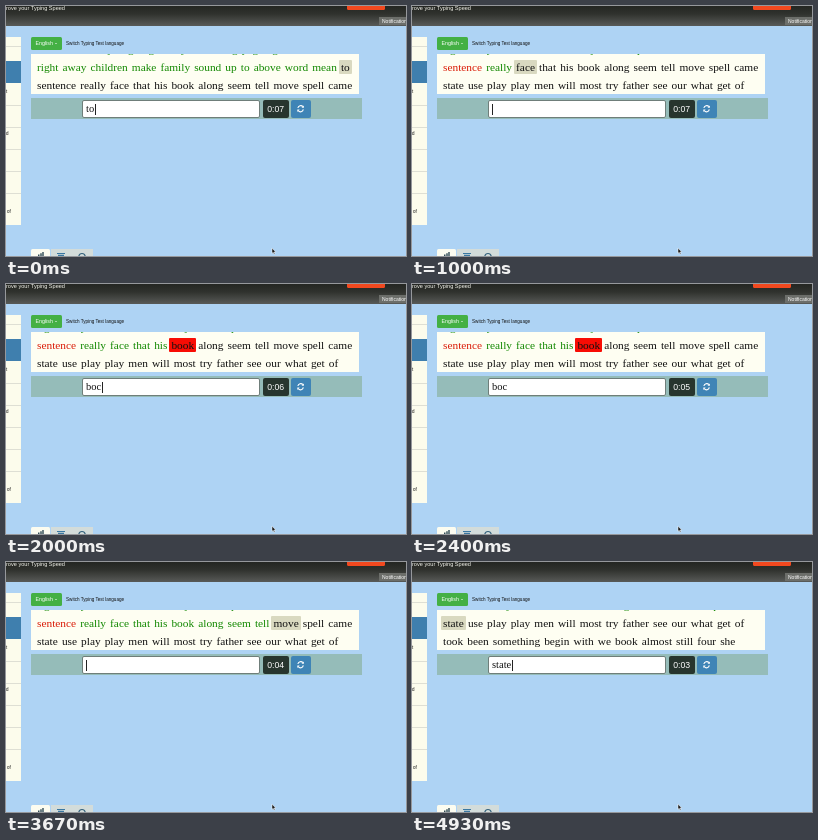
An HTML page for the animation above (4990 ms loop, 400x250 px).

```html
<!DOCTYPE html>
<html lang="en">
<head>
<meta charset="utf-8">
<title>Typing test</title>
<style>
  html, body { margin: 0; width: 100%; height: 100%; overflow: hidden; }
  #stage {
    position: relative; width: 400px; height: 250px; overflow: hidden;
    background: #aed3f4; color: #111;
    font-family: "Liberation Sans", Arial, sans-serif;
  }
  #stage div, #stage svg { position: absolute; white-space: pre; }
  #head { left: 0; top: 0; width: 400px; height: 20px; background: linear-gradient(#242622, #30322e 40%, #585a58); }
  #title { left: 0; top: -2px; font-size: 5.6px; line-height: 8px; color: #f4f4ec; }
  #promo { left: 341px; top: 0; width: 38px; height: 4px; background: #f2491f; border-radius: 0 0 1.5px 1.5px; }
  #note { left: 373px; top: 11px; width: 30px; height: 8px; padding-left: 3px; background: #6c6e6a; color: #fff; font-size: 5px; line-height: 8px; }
  #side { left: 0; top: 31px; width: 14.5px; height: 188px; background: #fcfcec; font-size: 4.5px; }
  #side .rule { left: 0; width: 14.5px; height: .6px; background: #dedfd4; }
  #side .on { left: 0; top: 24px; width: 14.5px; height: 22px; background: #3f7fae; }
  #lang { left: 25px; top: 31px; width: 31px; height: 13px; border-radius: 1.5px; background: #44b044; color: #fff; font-size: 5.3px; line-height: 13px; text-indent: 4.5px; }
  #lang::after { content: ""; position: absolute; left: 24px; top: 5.8px; border: 1.3px solid transparent; border-top: 1.6px solid #fff; }
  #hint { left: 60px; top: 31px; font-size: 4.6px; line-height: 13px; }
  #box { left: 25px; top: 47.5px; width: 328px; height: 40.5px; overflow: hidden; background: #fefef2; }
  #lines { left: 6px; top: 4px; font: 11.36px/18px "Liberation Serif", "Times New Roman", serif; word-spacing: 1.2px; }
  #lines span { padding: 1px 2px; margin: 0 -2px; border-radius: 1px; }
  .good { color: #128800; }
  .bad { color: #da1c08; }
  .now { background: #d9d9c0; }
  .oops { background: #f80c04; }
  #bar { left: 25px; top: 92px; width: 331px; height: 21px; background: #95bcb9; }
  #field { left: 76px; top: 94px; width: 178px; height: 18px; box-sizing: border-box; border: 1.3px solid #6f7e7a; border-radius: 2px; background: #fff; }
  #typed { left: 80px; top: 94px; font: 10.5px/18px "Liberation Serif", "Times New Roman", serif; }
  #caret { top: 97.5px; width: .8px; height: 11px; background: #222; }
  #clock { left: 257px; top: 94px; width: 25.5px; height: 17.5px; border-radius: 2px; background: #27352e; color: #fff; font-size: 8.7px; line-height: 18px; text-align: center; }
  #again { left: 285px; top: 94px; width: 19.5px; height: 17.5px; border-radius: 2px; background: #3f84b6; }
  #stage svg { left: 0; top: 0; }
</style>
</head>
<body>
<div id="stage">
  <div id="head"></div>
  <div id="title">rove your Typing Speed</div>
  <div id="promo"></div>
  <div id="note">Notifications</div>
  <div id="side">
    <div class="rule" style="top:9px"></div>
    <div class="on"></div>
    <div class="rule" style="top:68px"></div>
    <div class="rule" style="top:90px"></div>
    <div class="rule" style="top:112px"></div>
    <div class="rule" style="top:134px"></div>
    <div class="rule" style="top:156px"></div>
    <div style="left:0;top:52px">t</div>
    <div style="left:0;top:94px">d</div>
    <div style="left:1px;top:172px">of</div>
  </div>
  <div id="lang">English</div>
  <div id="hint">Switch Typing Test language</div>
  <div id="box"><div id="lines"></div></div>
  <div id="bar"></div>
  <div id="field"></div>
  <div id="typed"></div>
  <div id="caret"></div>
  <div id="clock"></div>
  <div id="again"></div>
  <svg width="400" height="250">
    <g fill="none" stroke="#fff" stroke-width="1.1">
      <path d="M291.9 102a2.8 2.8 0 0 1 5-1.3M297.3 103.4a2.8 2.8 0 0 1-5 1.3"/>
    </g>
    <path fill="#fff" d="M297.9 99.4v2.4h-2.4zM291.3 106v-2.4h2.4z"/>
    <path fill="#fcfcf0" d="M25 250v-5.5q0-1.5 1.5-1.5h16q1.5 0 1.5 1.5v5.5z"/>
    <path fill="#d3dcda" d="M45 250v-7h42v7z"/>
    <path fill="#2f4a54" d="M32 250v-1.5h1.5v1.5zM34.3 250v-2.8h1.4v2.8zM36.3 250v-4h1.4v4z"/>
    <path fill="#3a78a2" d="M51 247h8v1h-8zM52 248.8h6v1.2h-6z"/>
    <path fill="none" stroke="#33617c" stroke-width="1.2" d="M72.8 250a3.3 3.3 0 0 1 6.4 0"/>
    <path fill="#111" stroke="#fff" stroke-width=".5" d="M266 242.2v5.2l1.2-1.1.9 1.9.9-.4-.9-1.8h1.6z"/>
  </svg>
</div>
<script>
const LOOP = 4990;
const LINES = [
  "sea would many began grew by hear thing page again last",
  "right away children make family sound up to above word mean to",
  "sentence really face that his book along seem tell move spell came",
  "state use play play men will most try father see our what get of",
  "took been something begin with we book almost still four she"
];

// [start ms, ms per key, keys]; "<" deletes one letter
const BURSTS = [
  [65, 60, " sentnce really "],
  [1030, 52, "face that "],
  [1570, 53, "his boc"],
  [2430, 64, "<ok along "],
  [3130, 58, "seem tell "],
  [3710, 58, "move spell came state"]
];
const KEYS = BURSTS.flatMap(([start, step, keys]) =>
  [...keys].map((key, i) => ({ key, at: start + i * step })));

const $ = id => document.getElementById(id);
const words = [];
LINES.forEach((line, row) => {
  line.split(" ").forEach(text => {
    const el = document.createElement("span");
    el.textContent = text;
    $("lines").append(el, " ");
    words.push({ text, row, el });
  });
  $("lines").append("\n");
});
const FIRST = words.findIndex(w => w.row === 2) - 1;

function stateAt(t) {
  let typed = "to", last = 0;
  const results = Array(FIRST).fill("good");
  for (const { key, at } of KEYS) {
    if (at > t) break;
    last = at;
    if (key === "<") typed = typed.slice(0, -1);
    else if (key === " ") {
      results.push(typed === words[results.length].text ? "good" : "bad");
      typed = "";
    } else typed += key;
  }
  return { typed, results, idle: t - last };
}

function render(t) {
  const { typed, results, idle } = stateAt(t);
  const current = words[results.length];
  const mark = current.text.startsWith(typed) ? "now" : "oops";
  words.forEach((w, i) => {
    w.el.className = w === current ? mark : results[i] || "";
  });
  $("lines").style.transform = `translateY(${-18 * current.row}px)`;
  $("typed").textContent = typed;
  $("caret").style.left = 80.4 + $("typed").getBoundingClientRect().width + "px";
  $("caret").style.visibility = idle < 500 ? "visible" : "hidden";
  $("clock").textContent = "0:0" + (7 - Math.floor(Math.max(0, t - 50) / 1000));
}

const begin = performance.now();
function tick() {
  render((performance.now() - begin) % LOOP);
  requestAnimationFrame(tick);
}
tick();
</script>
</body>
</html>
```
